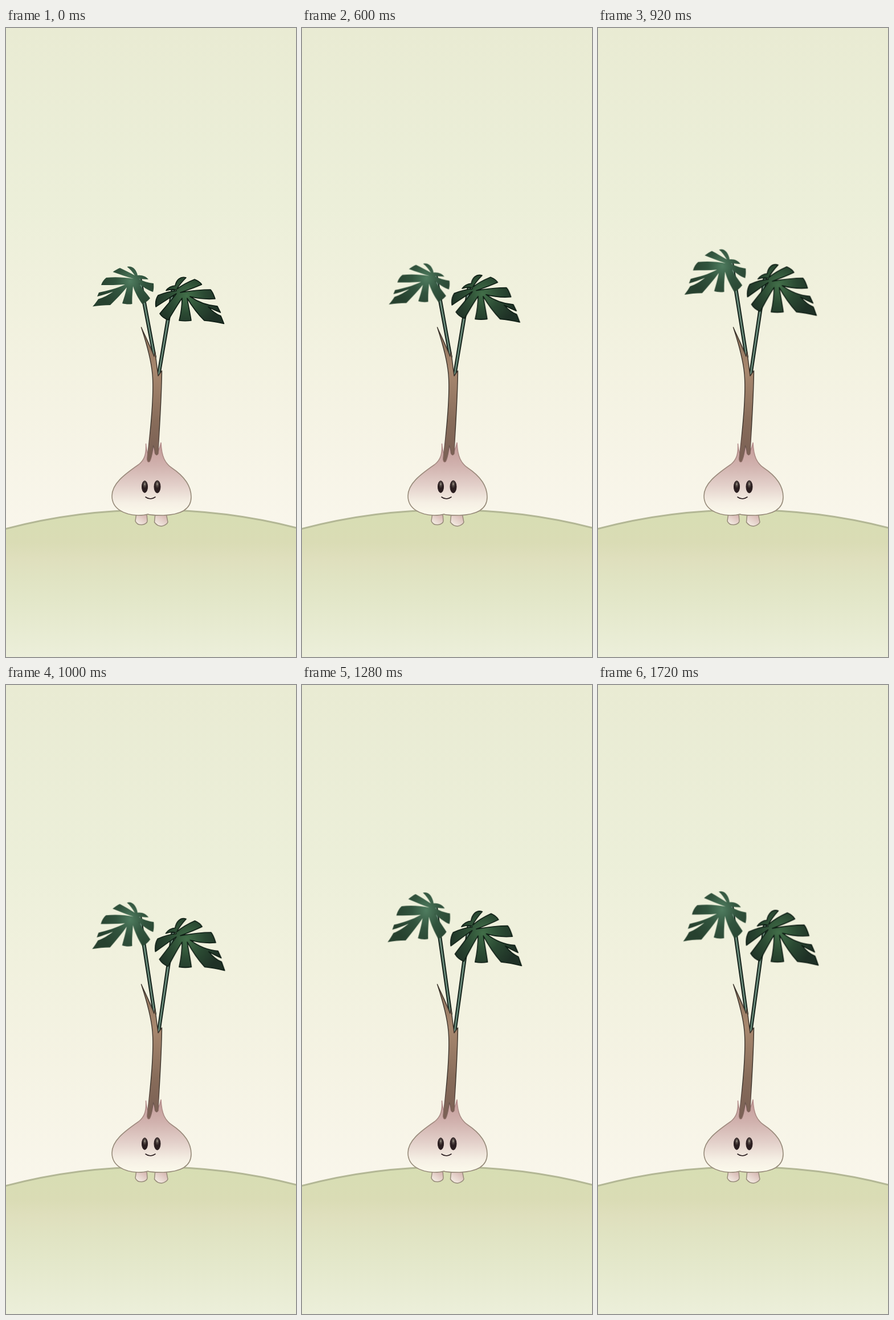
An HTML page for the animation above (1760 ms loop, 509 by 1101 pixels).

```html
<!DOCTYPE html>
<html lang="en">
<head>
<meta charset="utf-8">
<title>Sprouting bulb</title>
<style>
  html, body { margin: 0; width: 100%; height: 100%; overflow: hidden; background: #f0f1dd; }
  svg { display: block; width: 100vw; height: 100vh; }

  .leaf, .leaf > g, .stem { animation: 1.76s linear infinite; }
  .leaf { animation-name: rise; }
  .leaf > g { animation-name: widen; }
  .stem { animation-name: stretch; fill: #688878; stroke: #0e1b14; stroke-width: 1.8; }
  .leaf path, .stem { vector-effect: non-scaling-stroke; stroke-linejoin: round; }

  /* --lift and --tall move a leaf, --wide scales it sideways, --long grows its stem */
  .left  { --lift: -56.5px; --tall: 1.255; --wide: 1.033; --long: 1.373; }
  .right { --lift: -42px; --tall: 1.184; --wide: 1.055; --long: 1.253; }
  .left.leaf, .left.leaf > g { transform-origin: 228px 417.5px; }
  .right.leaf, .right.leaf > g { transform-origin: 308px 436px; }
  .left.stem { transform-origin: 260px 575px; }
  .right.stem { transform-origin: 268px 608px; }

  @keyframes rise {
    0% { transform: translateY(0) scaleY(1); }
    22.73% { transform: translateY(0) scaleY(1); animation-timing-function: cubic-bezier(.37, 0, .63, 1); }
    79.55%, 100% { transform: translateY(var(--lift)) scaleY(var(--tall)); }
  }
  @keyframes stretch {
    0% { transform: scaleY(1); }
    22.73% { transform: scaleY(1); animation-timing-function: cubic-bezier(.37, 0, .63, 1); }
    79.55%, 100% { transform: scaleY(var(--long)); }
  }
  @keyframes widen {
    0% { transform: scaleX(1); animation-timing-function: ease-out; }
    25% { transform: scaleX(.993); animation-timing-function: cubic-bezier(.37, 0, .63, 1); }
    97.7%, 100% { transform: scaleX(var(--wide)); }
  }
</style>
</head>
<body>
<svg viewBox="0 0 509 1101" preserveAspectRatio="none">
  <defs>
    <linearGradient id="sky" gradientUnits="userSpaceOnUse" x1="0" y1="0" x2="0" y2="870">
      <stop offset="0" stop-color="#e9ebd3"/>
      <stop offset=".35" stop-color="#ecefd9"/>
      <stop offset=".57" stop-color="#f1f1de"/>
      <stop offset=".78" stop-color="#f5f3e4"/>
      <stop offset="1" stop-color="#f9f6eb"/>
    </linearGradient>
    <linearGradient id="hill" gradientUnits="userSpaceOnUse" x1="0" y1="844" x2="0" y2="1101">
      <stop offset="0" stop-color="#d7deb3"/>
      <stop offset=".22" stop-color="#dadcb5"/>
      <stop offset=".33" stop-color="#dfdfbd"/>
      <stop offset=".45" stop-color="#e0e3c2"/>
      <stop offset=".62" stop-color="#e3e7c9"/>
      <stop offset="1" stop-color="#ecefda"/>
    </linearGradient>
    <linearGradient id="skin" gradientUnits="userSpaceOnUse" x1="0" y1="728" x2="0" y2="853">
      <stop offset="0" stop-color="#c39a98"/>
      <stop offset=".3" stop-color="#d1b2ae"/>
      <stop offset=".58" stop-color="#e3d0ca"/>
      <stop offset=".82" stop-color="#f5efe4"/>
      <stop offset="1" stop-color="#fcfaec"/>
    </linearGradient>
    <linearGradient id="rim" gradientUnits="userSpaceOnUse" x1="0" y1="728" x2="0" y2="790">
      <stop offset="0" stop-color="#b78d8d"/>
      <stop offset="1" stop-color="#978b7a"/>
    </linearGradient>
    <linearGradient id="foot" x1="1" y1="0" x2=".3" y2="1">
      <stop offset="0" stop-color="#cfaaa6"/>
      <stop offset="1" stop-color="#f4ece3"/>
    </linearGradient>
    <linearGradient id="bark" gradientUnits="userSpaceOnUse" x1="0" y1="524" x2="0" y2="760">
      <stop offset="0" stop-color="#8a7059"/>
      <stop offset=".32" stop-color="#a8886f"/>
      <stop offset=".7" stop-color="#876c5a"/>
      <stop offset="1" stop-color="#795f54"/>
    </linearGradient>
    <linearGradient id="edge" gradientUnits="userSpaceOnUse" x1="0" y1="700" x2="0" y2="760">
      <stop offset="0" stop-color="#3b332b"/>
      <stop offset="1" stop-color="#94726b"/>
    </linearGradient>
    <radialGradient id="pale" gradientUnits="userSpaceOnUse" cx="218" cy="443" r="56">
      <stop offset="0" stop-color="#507d60"/>
      <stop offset=".45" stop-color="#32543e"/>
      <stop offset="1" stop-color="#27412f"/>
    </radialGradient>
    <radialGradient id="deep" gradientUnits="userSpaceOnUse" cx="317" cy="469" r="60">
      <stop offset="0" stop-color="#426f49"/>
      <stop offset=".5" stop-color="#2b4a33"/>
      <stop offset="1" stop-color="#1f3126"/>
    </radialGradient>
    <radialGradient id="eye" cx=".5" cy=".28" r=".36">
      <stop offset="0" stop-color="#aaa496"/>
      <stop offset=".4" stop-color="#574c48"/>
      <stop offset="1" stop-color="#2b1e20"/>
    </radialGradient>
  </defs>

  <rect width="509" height="1101" fill="url(#sky)"/>
  <circle cx="258" cy="1863.500" r="1020" fill="url(#hill)" stroke="#b3b795" stroke-width="3"/>

  <g fill="url(#foot)" stroke="#978b7a" stroke-width="1.5">
    <path d="M229 849L227 863C229 868 234 870 239 869.500C244 869 248 866 248 863L247 849Z"/>
    <path d="M262 849L260.500 865C264 870 268 872 273 872C278 871.500 283 868 284 865L281 849Z"/>
  </g>
  <path fill="url(#skin)" stroke="url(#rim)" stroke-width="1.6" stroke-linejoin="round"
    d="M245.500 728C246.500 746 243 756 233 764C207 782 186 798 186 819C186 841 206 852 232 853C240 853 246 852 249 851C253 853 265 853 276 853C305 852 325 843 325 821C325 796 306 780 291 770C279 762 273 750 272 726C271 732 269 737 267 741L262 728L254 728L249 745C247 740 246 735 245.500 728Z"/>

  <g fill="url(#eye)" stroke="#2b1e20">
    <ellipse cx="243.500" cy="803" rx="5" ry="10.300"/>
    <ellipse cx="265.500" cy="803" rx="5.500" ry="10.800"/>
  </g>
  <path d="M245 821Q253 827 262 821" fill="none" stroke="#2b1e20" stroke-width="1.6" stroke-linecap="round"/>

  <path class="left stem" d="M231.500 437L237 437L263 576L258.500 576Z"/>
  <path class="right stem" d="M290.500 458L296 458L270 608L265.500 608Z"/>

  <path fill="url(#bark)" stroke="url(#edge)" stroke-width="1.4" stroke-linejoin="round"
    d="M237.500 524C243 537 252 554 260 575L261.500 566C263.500 580 265 595 267 609L273.500 600C273 650 269 700 267 745C265 749 262 747 261.500 744C261 738 260 734 258.500 731C257 740 256 753 252 759C249 761 247 757 248 752C255 694 260 640 257 606C255 582 246 550 237.500 524Z"/>

  <g class="left leaf"><g>
    <path fill="url(#pale)"
      d="M212.500 418C222 415.500 229 423 231 433C239 432 246 435 250 440C243 440 237 439 232 439C240 443 250 446 259 447C259.500 452 259.500 457 258 462C249 459 240 453 233 447C239 456 247 465 253 473C249 478 244 481 239 483C232 473 226 462 223 452C222 462 221 473 221.500 483C216 484 209 483.500 204 482C207 473 210 464 212 454C203 465 193 475 183 485C172 485 162 486 152 487.500C156 483 159 479 162 474.500C171 472 180 467 188 461.500C178 465 169 468 160 470L163 463C178 460 194 456 209 449C195 450 181 450 167 450C169 444 172 440 176 437C192 435.500 210 436.500 224 439C212 435.500 199 431 187.500 427C192 424 196 421.500 200 420C209 424 218 429 226 433C222 427 218 422 212.500 418Z"/>
  </g></g>

  <g class="right leaf"><g>
    <path fill="url(#deep)" stroke="#0d1c13" stroke-width="1.6"
      d="M316 437C306 434 299 441 297 451C291 451 284 455 281 459.500C286 458 292 457 298 458L299 460C286 461 277 464 267 468C263 474 262 481 263 488C274 481 287 472 299 465C290 477 280 488 270 500C274 506 279 509 285 511C293 498 301 484 309 473C309 486 307 500 304 512C311 513 318 513 325 512C323 499 320 486 318 473C327 488 337 501 348 512C360 513 371 515 382.500 517.500C380 512 379 508 377 504C369 501 362 496 355 488C362 492 369 495 376.500 498L371 487C355 486 339 481 323 470C338 474 353 475 367 474C365 468 363 462 359 458C343 458 325 460 306 463C318 459 332 454 343.500 449C341 445 336 442 331 440C321 444 310 449 300 457C304 449 310 443 316 437Z"/>
  </g></g>
</svg>
</body>
</html>
```
